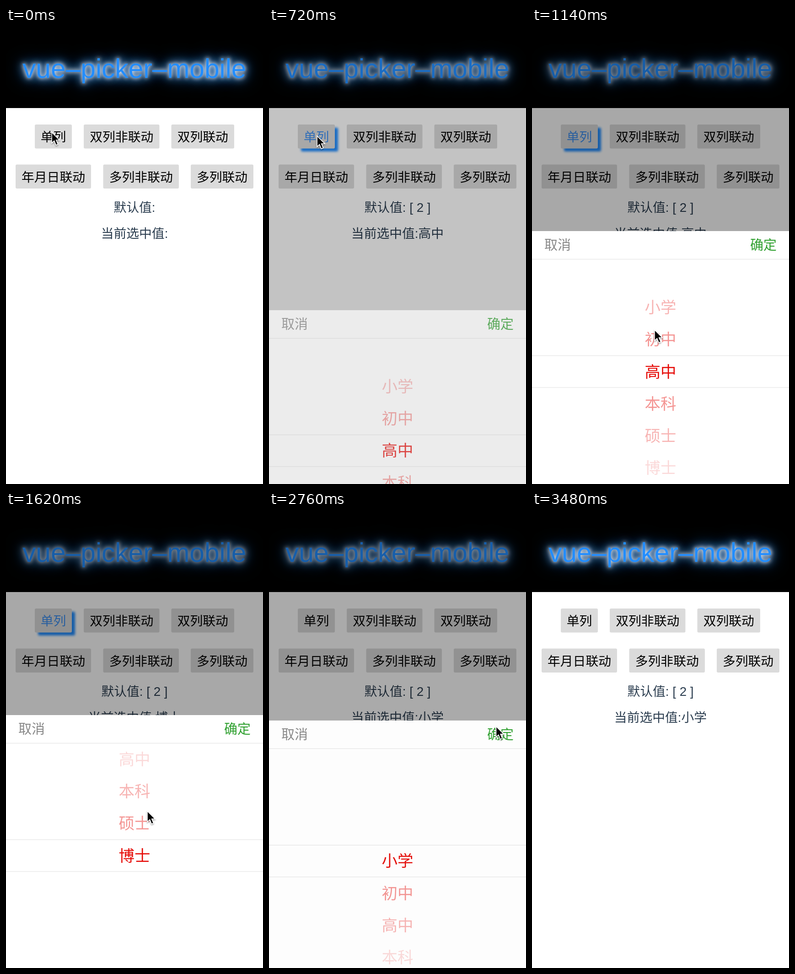
These frames come from a looping animation (562x997 px, 3.54 s). An HTML page:

```html
<!DOCTYPE html>
<html lang="zh">
<head>
<meta charset="utf-8">
<title>vue-picker-mobile</title>
<style>
html, body { margin: 0; width: 100%; height: 100%; overflow: hidden; background: #fff; }
#stage { position: relative; width: 562px; height: 997px; overflow: hidden; }
header { position: absolute; top: 0; left: 0; width: 562px; height: 175px; background: #000; }
h1 {
  position: absolute; left: 36px; top: 55px; margin: 0; white-space: nowrap;
  font: 400 58.7px/67px "Liberation Sans", Arial, sans-serif; color: #228dff;
  text-shadow: 0 0 8px #fff, 0 0 17px #c4dcff, 0 0 26px #228dff, 0 0 40px #228dff;
}
svg { position: absolute; top: 0; left: 0; }
text { font-family: "Liberation Sans", "Noto Sans CJK SC", "Noto Sans CJK", sans-serif; text-anchor: middle; }
#page text { font-size: 27.8px; }
#items text { font-size: 34.5px; fill: #e60c08; }
</style>
</head>
<body>
<div id="stage">
  <header><h1>vue–picker–mobile</h1></header>
  <svg width="562" height="997" viewBox="0 0 562 997">
    <defs>
      <clipPath id="body"><rect y="62" width="562" height="491"/></clipPath>
      <filter id="soft" x="-30%" y="-30%" width="160%" height="160%"><feGaussianBlur stdDeviation="2.5"/></filter>
      <filter id="drop" x="-50%" y="-50%" width="200%" height="200%">
        <feDropShadow dx="0" dy="2" stdDeviation="1.6" flood-opacity=".4"/>
      </filter>
    </defs>
    <g id="page">
      <rect id="halo" x="70" y="218" width="81" height="52" rx="3" fill="#228dff" filter="url(#soft)"/>
      <g id="buttons"></g>
      <text id="preset" x="281" y="402" fill="#2c3e50"></text>
      <text id="value" x="281" y="458.5" fill="#2c3e50"></text>
    </g>
    <rect id="mask" width="562" height="997"/>
    <g id="panel">
      <rect width="562" height="553" fill="#fff"/>
      <g font-size="29">
        <text x="56" y="41" fill="#888">取消</text>
        <text x="506" y="41" fill="#2fa02f">确定</text>
      </g>
      <path d="M0 61.5H562M0 272.5H562M0 342H562" stroke="#e0e0e0"/>
      <g clip-path="url(#body)"><g id="items"></g></g>
    </g>
    <path id="cursor" d="M0 0V23.5L5.4 18.6L9.3 28L13.6 26.2L9.7 17H17Z" fill="#000" stroke="#fff" stroke-width="1.6" filter="url(#drop)"/>
  </svg>
</div>
<script>
const LOOP = 3540, PANEL = 553, ROW = 70.3;
const CLICK = 540, OPEN = 600, CONFIRM = 2700, CLOSE = 2750, SLIDE = 300;
const names = ["小学", "初中", "高中", "本科", "硕士", "博士"];
const fades = [1, .43, .3, .15, .06, 0];
const $ = id => document.getElementById(id);

function add(parent, tag, attrs, label = "") {
  const node = document.createElementNS("http://www.w3.org/2000/svg", tag);
  for (const key in attrs) node.setAttribute(key, attrs[key]);
  node.textContent = label;
  return parent.appendChild(node);
}

function button(x, y, w, label) {
  add($("buttons"), "rect", { x, y, width: w, height: 52.5, rx: 3, fill: "#dbdbdb" });
  return add($("buttons"), "text", { x: x + w / 2, y: y + 37 }, label);
}
const single = button(63, 211, 81, "单列");
button(170, 211, 165.5, "双列非联动");
button(361.5, 211, 137.5, "双列联动");
button(21, 298.5, 165, "年月日联动");
button(212.5, 298.5, 165.5, "多列非联动");
button(404, 298.5, 137, "多列联动");
const rows = names.map(name => add($("items"), "text", { x: 281 }, name));

const clamp = v => Math.min(1, Math.max(0, v));
const smooth = k => k * k * (3 - 2 * k);
const easeOut = k => 1 - (1 - k) ** 3;

// CSS "ease": cubic-bezier(.25, .1, .25, 1)
function ease(x) {
  let lo = 0, hi = 1, s = .5;
  for (let i = 0; i < 20; i++) {
    s = (lo + hi) / 2;
    const bx = .75 * s * (1 - s) ** 2 + .75 * s * s * (1 - s) + s ** 3;
    if (bx < x) lo = s; else hi = s;
  }
  return .3 * s * (1 - s) ** 2 + 3 * s * s * (1 - s) + s ** 3;
}
const ramp = (t, start, length, curve) => curve(clamp((t - start) / length));

// time, x, y of the pointer tip
const path = [
  [0, 100, 228], [480, 105, 236], [780, 105, 236], [1140, 268, 660], [1230, 282, 745],
  [1440, 305, 625], [1620, 309, 654], [1740, 312, 590], [1980, 332, 800],
  [2060, 336, 790], [2280, 359, 498], [2580, 498, 468], [2700, 500, 470],
  [2880, 487, 465], [3420, 470, 1010]
];
function pointer(t) {
  let i = 1;
  while (i < path.length - 1 && path[i][0] < t) i++;
  const [t0, x0, y0] = path[i - 1], [t1, x1, y1] = path[i];
  const k = smooth(clamp((t - t0) / (t1 - t0)));
  return [x0 + (x1 - x0) * k, y0 + (y1 - y0) * k];
}

function draw(t) {
  const active = t >= CLICK && t < CONFIRM;
  const shown = ramp(t, OPEN, SLIDE, ease) - ramp(t, CLOSE, SLIDE, ease);
  const pos = 2 + 3 * ramp(t, 1250, 340, easeOut) - 5 * ramp(t, 1750, 440, easeOut);
  const picked = Math.round(pos);

  $("halo").setAttribute("visibility", active ? "visible" : "hidden");
  single.setAttribute("fill", active ? "#3d8ff0" : "#000");
  $("preset").textContent = t < CLICK ? "默认值:" : "默认值: [ 2 ]";
  $("value").textContent = "当前选中值:" + (t < CLICK ? "" : names[picked]);

  $("mask").setAttribute("opacity", .34 * shown);
  $("panel").setAttribute("opacity", shown);
  $("panel").setAttribute("transform", `translate(0 ${444 + PANEL * (1 - shown)})`);
  rows.forEach((row, i) => {
    row.setAttribute("y", 319.5 + (i - pos) * ROW);
    row.setAttribute("opacity", fades[Math.abs(i - picked)]);
  });
  $("cursor").setAttribute("transform", `translate(${pointer(t)})`);
}

const start = performance.now();
function tick() {
  draw((performance.now() - start) % LOOP);
  requestAnimationFrame(tick);
}
draw(0);
tick();
</script>
</body>
</html>
```
